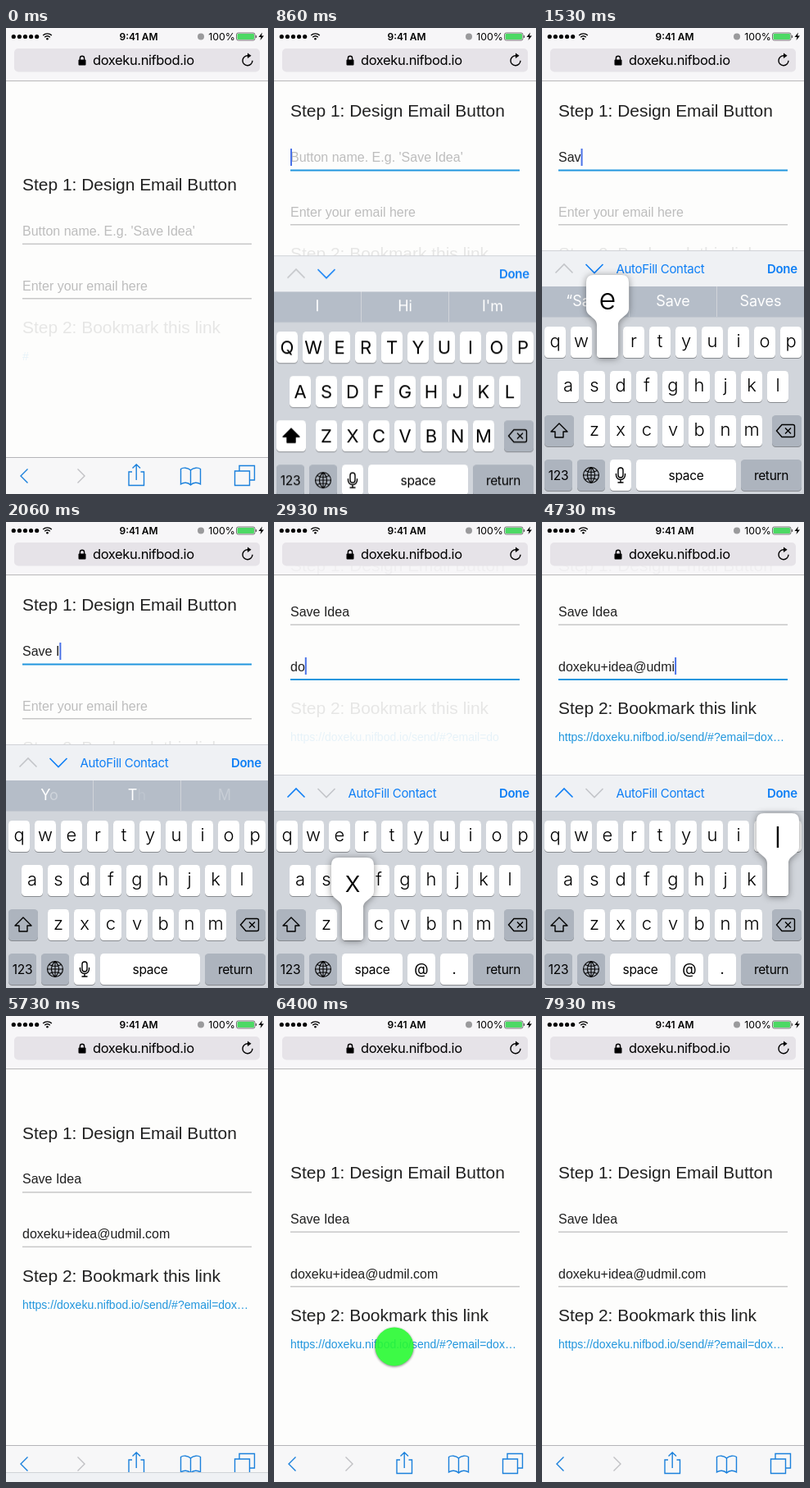
These frames come from a looping animation (320 px wide and 568 px high, 8 s). An HTML page:

```html
<!DOCTYPE html>
<html lang="en">
<head>
<meta charset="utf-8">
<title>Email button setup</title>
<style>
  html, body { margin: 0; width: 100%; height: 100%; overflow: hidden; background: #fdfdfc; }
  svg { display: block; width: 100%; height: 100%; }
  text { font-family: Inter, Roboto, sans-serif; white-space: pre; }
  .mid { text-anchor: middle; }
  .line { fill: none; stroke: #000; stroke-width: 1.4; }
  .blue { stroke: #1a80dc; }

  #page text { font-family: "Liberation Sans", Arial, sans-serif; font-size: 16px; fill: #212121; }
  #page .head { font-size: 20.95px; }
  #page .hint { fill: #bdbdbd; }
  #page #link { font-size: 14px; fill: #2196dd; }
  .rule { fill: #c8c8c8; height: 1.5px; }
  .rule.on { fill: #2196dd; height: 2px; }

  .key { font-size: 22px; text-anchor: middle; }
  .lower .key { font-weight: 300; transform: translateY(-1.6px); }
  #mailRow .key { font-size: 18px; transform: translateY(-2px); }
  .word { font-size: 15.5px; letter-spacing: -.02em; text-anchor: middle; }
  .tip { font-size: 18px; fill: #fff; text-anchor: middle; }
  .bar { font-size: 15px; fill: #0f7ff5; letter-spacing: -.02em; }
  .arrow { fill: none; stroke: #c3c5c9; stroke-width: 1.6; }
  .arrow.on { stroke: #0f7ff5; }
  #pop path { fill: #fff; filter: drop-shadow(0 1px 4px rgba(0,0,0,.42)); }
  #pop text { font-size: 36px; font-weight: 300; text-anchor: middle; }

  #page, #keys, #bar, #fill, #step2, #dot { animation: 8s linear infinite; }
  #page { animation-name: scroll; }
  #keys { animation-name: rise; }
  #bar { animation-name: drop; }
  #fill { animation-name: offer; }
  #step2 { animation-name: ready; }
  #dot { animation-name: touch; transform-origin: 147px 403px; }

  @keyframes scroll {
    0% { transform: translateY(0); }
    9.1% { transform: translateY(0); animation-timing-function: ease-out; }
    10.7%, 31% { transform: translateY(-90px); animation-timing-function: ease-out; }
    33.5%, 70% { transform: translateY(-138px); animation-timing-function: ease-out; }
    73.5%, 100% { transform: translateY(0); }
  }
  @keyframes rise {
    0% { transform: translateY(300px); }
    9.1% { transform: translateY(300px); animation-timing-function: cubic-bezier(.2,.8,.2,1); }
    11.67% { transform: translateY(0); }
    70% { transform: translateY(0); animation-timing-function: cubic-bezier(.3,.5,.3,1); }
    73.5%, 100% { transform: translateY(300px); }
  }
  @keyframes drop {
    0%, 31% { transform: translateY(0); animation-timing-function: ease-out; }
    33%, 90% { transform: translateY(37px); }
    90.01%, 100% { transform: translateY(0); }
  }
  @keyframes offer {
    0%, 11.7% { opacity: 0; }
    12.6%, 100% { opacity: 1; }
  }
  @keyframes ready {
    0%, 54% { opacity: .1; }
    57.5%, 100% { opacity: 1; }
  }
  @keyframes touch {
    0%, 78% { opacity: 0; transform: scale(.7); }
    80%, 86.6% { opacity: .9; transform: scale(1); }
    89.1%, 100% { opacity: 0; transform: scale(1); }
  }
</style>
</head>
<body>
<svg viewBox="0 0 320 568" preserveAspectRatio="none">
  <rect width="320" height="568" fill="#fdfdfc"/>

  <g id="page">
    <text class="head" x="20" y="197.9">Step 1: Design Email Button</text>
    <text class="hint" id="nameHint" x="20" y="252.5">Button name. E.g. 'Save Idea'</text>
    <text id="name" x="20" y="252.5"></text>
    <rect class="rule" id="nameRule" x="20" y="262.5" width="280"/>
    <text class="hint" id="mailHint" x="20" y="319.5">Enter your email here</text>
    <text id="mail" x="20" y="319.5"></text>
    <rect class="rule" id="mailRule" x="20" y="329" width="280"/>
    <rect id="caret" width="2" height="21" fill="#4a72e8"/>
    <g id="step2">
      <text class="head" x="20" y="371.9">Step 2: Bookmark this link</text>
      <text id="link" x="20" y="405">#</text>
    </g>
  </g>

  <g id="dot">
    <circle cx="147" cy="403" r="23.5" fill="#28fa32" style="filter:drop-shadow(0 1.5px 1.5px rgba(0,0,0,.55))"/>
  </g>

  <g id="header">
    <rect width="320" height="64.5" fill="#f7f6f8" fill-opacity=".97"/>
    <rect y="64" width="320" height="1" fill="#b9b8ba"/>
    <path d="M9.3 10.5H40" stroke="#000" stroke-width="5.2" stroke-linecap="round" stroke-dasharray="0 7.1"/>
    <path class="line" d="M45.2 9a7.6 7.6 0 0 1 10.6 0M47.2 11.2a5 5 0 0 1 6.6 0"/>
    <circle cx="50.5" cy="13.2" r="1.3"/>
    <text class="mid" x="162" y="14.7" font-size="12" font-weight="600">9:41 AM</text>
    <circle cx="238" cy="10.5" r="4" fill="#9a9a9c"/>
    <text class="mid" x="263.5" y="14.7" font-size="12.3">100%</text>
    <rect x="281.5" y="6" width="22.5" height="9" rx="2" fill="none" stroke="#555" stroke-width=".8"/>
    <rect x="282.5" y="7" width="20.5" height="7" rx="1" fill="#4cd964"/>
    <rect x="304.8" y="9" width="1.3" height="3" rx=".6" fill="#555"/>
    <path d="M313 5.5L308.5 11H311.5L310.5 15L315 9.5H312Z"/>
    <rect x="10" y="25" width="300" height="28.5" rx="5" fill="#e6e3e8"/>
    <rect x="88.5" y="38.5" width="9" height="7" rx="1"/>
    <path class="line" d="M90.4 39v-2.2a2.6 2.6 0 0 1 5.2 0V39"/>
    <text x="106" y="45" font-size="16.5" letter-spacing="-.4">doxeku.nifbod.io</text>
    <path class="line" d="M295.5 33.8A6 6 0 1 0 301 39.8"/>
    <path d="M295 30.6l4.6 3.2-4.6 3.2z"/>
  </g>

  <g id="tools">
    <rect y="523" width="320" height="45" fill="#f7f7f8"/>
    <rect y="523" width="320" height="1" fill="#b5b5b8"/>
    <path class="line blue" d="M26.5 537.5L18 546L26.5 554.5"/>
    <path class="line" style="stroke:#c0c0c4" d="M87.5 537.5L96 546L87.5 554.5"/>
    <path class="line blue" d="M154 541H150V557.5H168.5V541H164.5M159.2 551V532M154.5 536.5L159.2 532L164 536.5"/>
    <path class="line blue" d="M225.5 539C222 535.5 216 535.5 213.5 537.5V556C217 553.5 222 553.5 225.5 557C229 553.5 234 553.5 237.5 556V537.5C235 535.5 229 535.5 225.5 539V557"/>
    <path class="line blue" d="M279.5 540H297.5V557.5H279.5ZM285 540V533.5H303.5V551H297.5"/>
  </g>

  <g id="keys">
    <rect y="352" width="320" height="220" fill="#d1d5db"/>
    <rect y="315" width="320" height="37.5" fill="#b5bdc8"/>
    <path d="M106.5 315V352M213.5 315V352" stroke="#d0d4da"/>
    <text class="tip" x="53" y="339"></text>
    <text class="tip" x="160" y="339"></text>
    <text class="tip" x="267" y="339"></text>
    <g id="bar">
      <rect y="271" width="320" height="44" fill="#eff1f4"/>
      <rect y="271" width="320" height=".8" fill="#c8cbd0"/>
      <path class="arrow" id="up" d="M16.5 298.5L27 288L37.5 298.5"/>
      <path class="arrow" id="down" d="M53.5 288L64 298.5L74.5 288"/>
      <text class="bar" id="fill" x="90.5" y="299">AutoFill Contact</text>
      <text class="bar" x="275" y="299" font-weight="600">Done</text>
    </g>
    <g id="letters"></g>
    <g id="digits"></g>
    <g id="plainRow"></g>
    <g id="mailRow"></g>
    <g id="sideKeys"></g>
    <g id="pop">
      <path d="M-17-63H17Q26-63 26-54V-22C26-12 13-12 13-2V34Q13 38 9 38H-9Q-13 38-13 34V-2C-13-12-26-12-26-22V-54Q-26-63-17-63Z"/>
      <text y="-21.5"></text>
    </g>
  </g>
</svg>
<script>
const $ = id => document.getElementById(id);
const LOOP = 8000, NEXT = 2480, DONE = 5600;
const NAME = 'Save Idea', MAIL = 'doxeku+idea@udmil.com';
const nameTimes = [1130, 1280, 1430, 1560, 1720, 2030, 2200, 2300, 2390];
const mailTimes = [2780, 2880, 2980, 3080, 3180, 3260, 3560, 3930, 4010, 4110, 4220,
  4330, 4430, 4520, 4610, 4690, 4800, 5067, 5133, 5200, 5440];
const strokes = [...NAME].map((c, i) => [c, nameTimes[i]])
  .concat([...MAIL].map((c, i) => [c, mailTimes[i]]));
const faint = (s, a) => `<tspan fill-opacity="${a}">${s}</tspan>`;
const tips = [
  [0, 'I', 'Hi', "I'm"],
  [1130, '“S”', 'So', 'See'],
  [1430, '“Sav”', 'Save', 'Saves'],
  [1720, 'You', 'The', 'My'],
  [2045, 'Y' + faint('o', .35), 'T' + faint('h', .12), faint('M', .25)],
  [2100, '“I”', 'It', 'In'],
  [2390, '“Idea”', 'Ideas', 'Ideal']
];

// Keyboard
const spots = {};
const ROW = [364, 418, 472, 526];
const GREY = '#adb4be';
const cap = (x, y, w, fill = '#fff') =>
  `<rect x="${x}" y="${y + 1}" width="${w}" height="38" rx="4.5" fill="#888b90"/>` +
  `<rect x="${x}" y="${y}" width="${w}" height="38" rx="4.5" fill="${fill}"/>`;

function key(c, x, y, w = 26) {
  spots[c] ??= [x + w / 2, y];
  return cap(x, y, w) + `<text class="key" x="${x + w / 2}" y="${y + 26.7}">${c.replace('&', '&amp;')}</text>`;
}
const row = (chars, x, y, step = 32, w = 26) =>
  [...chars].map((c, i) => key(c, x + i * step, y, w)).join('');
const word = (s, x, w, fill) =>
  cap(x, ROW[3], w, fill) + `<text class="word" x="${x + w / 2}" y="551">${s}</text>`;
const icon = (x, y, d, extra = '') =>
  `<path class="line" transform="translate(${x} ${y})" d="${d}" ${extra}/>`;

$('letters').innerHTML = row('qwertyuiop', 3, ROW[0]) + row('asdfghjkl', 19, ROW[1]) + row('zxcvbnm', 51, ROW[2]);
$('plainRow').innerHTML = cap(83, ROW[3], 26) +
  icon(96, 545, 'M-3-6a3 3 0 0 1 6 0V0a3 3 0 0 1-6 0ZM-5.5-2V0a5.5 5.5 0 0 0 11 0V-2M0 5.5V9M-3.5 9H3.5') +
  word('space', 115, 122);
$('mailRow').innerHTML = word('space', 83, 74) + row('@.', 163, ROW[3], 40, 34);
$('digits').innerHTML = row('1234567890', 3, ROW[0]) + row('$!~&=#[]', 35, ROW[1]) + row('._-+', 51, ROW[2], 56, 50);
$('sideKeys').innerHTML =
  '<g id="shiftOff">' + cap(3, ROW[2], 36, GREY) + '</g><g id="shiftOn">' + cap(3, ROW[2], 36) + '</g>' +
  icon(21, 491, 'M0-9L10 1H5V8H-5V1H-10Z', 'id="shift" stroke-linejoin="round"') +
  cap(281, ROW[2], 36, GREY) +
  icon(298, 491, 'M-11.5 0L-5-7.5H8.5Q10.5-7.5 10.5-5.5V5.5Q10.5 7.5 8.5 7.5H-5ZM-1-3.5L6 3.5M6-3.5L-1 3.5') +
  word('<tspan id="mode">123</tspan>', 3, 34, GREY) +
  cap(43, ROW[3], 34, GREY) +
  icon(60, 545, 'M-9.5 0a9.5 9.5 0 1 0 19 0a9.5 9.5 0 1 0-19 0H9.5M0-9.5V9.5M0-9.5C-6-4-6 4 0 9.5C6 4 6-4 0-9.5M-7.5-5.5Q0-2 7.5-5.5M-7.5 5.5Q0 2 7.5 5.5', 'style="stroke-width:1.1"') +
  word('return', 243, 74, GREY);

const letterKeys = [...$('letters').querySelectorAll('text')];
const tipTexts = document.querySelectorAll('.tip');
const show = (id, on) => $(id).setAttribute('visibility', on ? 'visible' : 'hidden');
const typed = (s, times, t) => s.slice(0, times.filter(at => at <= t).length);

function draw(t) {
  const name = typed(NAME, nameTimes, t), mail = typed(MAIL, mailTimes, t);
  const open = t >= 790 && t < DONE, onMail = t >= NEXT;
  $('name').textContent = name;
  $('mail').textContent = mail;
  show('nameHint', !name);
  show('mailHint', !mail);
  $('link').textContent = mail
    ? 'https://doxeku.nifbod.io/send/#?email=' + (mail.length > 5 ? mail.slice(0, 3) + '…' : mail)
    : '#';

  $('nameRule').classList.toggle('on', open && !onMail);
  $('mailRule').classList.toggle('on', open && onMail);
  show('caret', open);
  $('caret').setAttribute('x', 20 + $(onMail ? 'mail' : 'name').getComputedTextLength());
  $('caret').setAttribute('y', onMail ? 303 : 237);

  $('up').classList.toggle('on', onMail);
  $('down').classList.toggle('on', !onMail);
  show('plainRow', !onMail);
  show('mailRow', onMail);

  const upper = t < 1140 || (t >= 1870 && t < 2040);
  const digits = t >= 3340 && t < 3690;
  letterKeys.forEach(k => {
    k.textContent = upper ? k.textContent.toUpperCase() : k.textContent.toLowerCase();
  });
  $('letters').classList.toggle('lower', !upper);
  show('letters', !digits);
  show('digits', digits);
  show('shiftOn', upper);
  show('shiftOff', !upper);
  $('shift').style.fill = upper ? '#000' : 'none';
  $('mode').textContent = digits ? 'ABC' : '123';

  const tip = tips.filter(r => r[0] <= t).pop();
  tipTexts.forEach((e, i) => { e.innerHTML = tip[i + 1]; });

  const hit = strokes.find(([c, at]) => c !== ' ' && t >= at - 80 && t < at);
  show('pop', hit);
  if (hit) {
    const [x, y] = spots[hit[0].toLowerCase()];
    $('pop').setAttribute('transform', `translate(${x} ${y})`);
    $('pop').lastElementChild.textContent = hit[0];
  }
}

let start;
function tick(now) {
  start ??= now;
  draw((now - start) % LOOP);
  requestAnimationFrame(tick);
}
draw(0);
requestAnimationFrame(tick);
</script>
</body>
</html>
```
